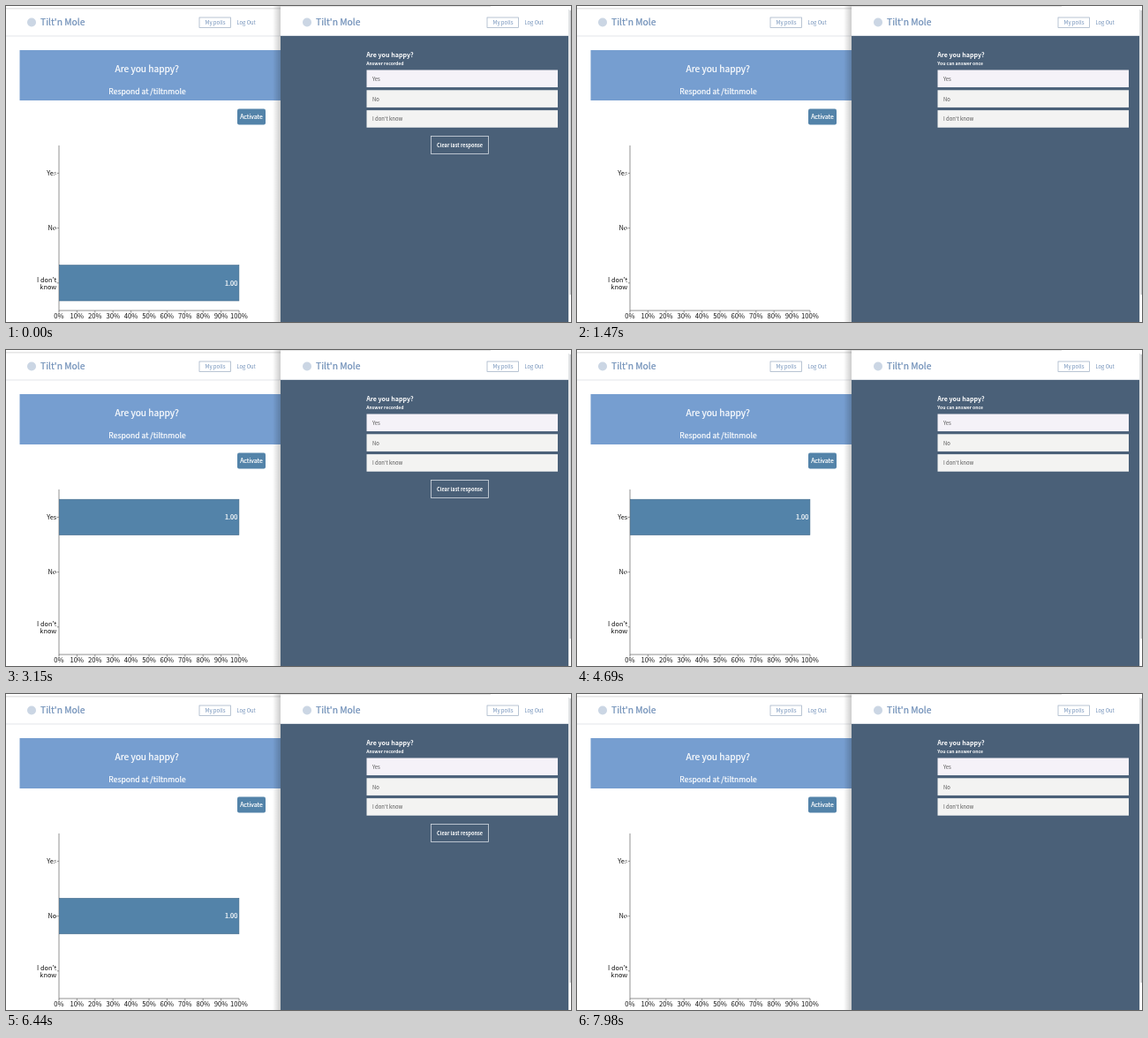
An HTML page for the animation above (8000 ms loop, 640x358 px).

```html
<!DOCTYPE html>
<html lang="en">
<head>
<meta charset="utf-8">
<title>Live poll</title>
<style>
  html, body { margin: 0; width: 100%; height: 100%; overflow: hidden; background: #fff; }
  svg { display: block; width: 100vw; height: 100vh; }
  text { font-family: "Noto Sans CJK SC", "Noto Sans CJK JP", "Noto Sans CJK", "Open Sans", sans-serif; }
  .bold { font-weight: 700; }
  .semi { stroke: currentColor; stroke-width: .22px; }
</style>
</head>
<body>
<svg id="stage" viewBox="0 0 640 358" preserveAspectRatio="none">
  <defs>
    <linearGradient id="shade">
      <stop offset="0" stop-color="#000" stop-opacity="0"/>
      <stop offset="1" stop-color="#000" stop-opacity=".2"/>
    </linearGradient>
  </defs>
</svg>
<script>
const NS = "http://www.w3.org/2000/svg";
const stage = document.getElementById("stage");
const LOOP = 8000;
const BLUE = "#5383a9", NAVY = "#4a6078", LINK = "#6f8fb8", WHITE = "#fff";
const OPTIONS = ["Yes", "No", "I don't know"];

function add(tag, attrs, parent = stage) {
  const el = document.createElementNS(NS, tag);
  for (const key in attrs) el.setAttribute(key, attrs[key]);
  parent.appendChild(el);
  return el;
}

function rect(x, y, width, height, fill, extra = {}, parent = stage) {
  return add("rect", { x, y, width, height, fill, ...extra }, parent);
}

function line(x1, y1, x2, y2, stroke, width = 0.8) {
  return add("line", { x1, y1, x2, y2, stroke, "stroke-width": width });
}

function text(content, x, y, size, fill, extra = {}, parent = stage) {
  const el = add("text", { x, y, "font-size": size, fill, color: fill, ...extra }, parent);
  el.textContent = content;
  return el;
}

const MIDDLE = { "text-anchor": "middle" }, END = { "text-anchor": "end" };
const BOLD = { class: "bold" }, SEMI = { class: "semi" };

function header(x, navX) {
  add("circle", { cx: x + 29, cy: 18.5, r: 5, fill: "#cbd6e4" });
  text("Tilt'n Mole", x + 39, 21.8, 10.3, LINK, SEMI);
  rect(navX, 13, 35.5, 11.5, "none", { stroke: "#9aabc0", "stroke-width": 0.7 });
  text("My polls", navX + 18, 21, 6, LINK, MIDDLE);
  text("Log Out", navX + 42.5, 21, 5.8, LINK);
}

// Results page
rect(0, 0, 640, 358, WHITE);
rect(0, 2.4, 311, 1, "#d8d8d8");
rect(0, 33.5, 311, 1, "#e4e6e9");
header(0, 219);
rect(15.5, 50, 295.5, 57, "#769ed0");
text("Are you happy?", 159.7, 75.2, 10.2, WHITE, { ...MIDDLE, ...SEMI });
text("Respond at /tiltnmole", 160, 100.2, 8.6, WHITE, { ...MIDDLE, ...SEMI });
rect(262, 116.5, 32, 18, BLUE, { rx: 2 });
text("Activate", 278, 128, 6.9, WHITE, { ...MIDDLE, ...SEMI });

// Chart
const rowY = i => 189.4 + i * 62.2;
line(60, 158, 60, 345.4, "#777");
line(60, 345, 264, 345, "#777");
for (let i = 0; i <= 10; i++) {
  const x = 60 + i * 20.4;
  line(x, 345, x, 347.6, "#777");
  text(i * 10 + "%", x, 354.2, 7.7, "#111", MIDDLE);
}
const rows = OPTIONS.map((name, i) => {
  const y = rowY(i);
  line(57.5, y, 60, y, "#777");
  const parts = i === 2 ? ["I don't", "know"] : [name];
  parts.forEach((part, k) =>
    text(part, 57.3, y + 2.7 + (parts.length > 1 ? k * 8 - 4 : 0), 7.4, "#111", END));
  const bar = add("g", {});
  rect(60.3, y - 20.2, 203.6, 40.4, BLUE, { stroke: "#41698a", "stroke-width": 0.6 }, bar);
  text("1.00", 262.2, y + 2.7, 7.3, WHITE, { ...END, ...SEMI }, bar);
  // A zero value is white and overlaps the label's end
  const zero = text("0", 58, y + 2.7, 7.3, WHITE, { ...END, ...SEMI });
  return { bar, zero };
});

// Voting page
rect(302, 0, 9, 358, "url(#shade)");
rect(311, 0, 329, 358, WHITE);
rect(311, 0, 238, 0.8, "#dedede");
rect(311, 33, 326, 1, "#dfe3e8");
header(312, 545);
rect(311, 34, 326, 324, NAVY);
rect(637, 4, 0.7, 354, "#d5d8dc");
rect(638.6, 5, 1.2, 322, "#b9bcc0");
text("Are you happy?", 408.3, 58, 7.1, WHITE, BOLD);
const note = text("", 408.3, 67.3, 5.1, WHITE, BOLD);
OPTIONS.forEach((name, i) => {
  const y = 72.5 + i * 22.8;
  rect(408.5, y, 216.5, 19.6, i ? "#f3f3f2" : "#f5f2f8");
  text(name, 415, y + 12.2, 5.9, "#555");
});
const clear = add("g", {});
rect(481.4, 147.4, 65.2, 20.2, "none", { stroke: "#d5dce4", "stroke-width": 0.8 }, clear);
text("Clear last response", 514, 159.9, 5.6, WHITE, { ...MIDDLE, ...BOLD }, clear);

// The chart follows each vote or clear after a short delay
const LAG = 140;
const VOTES = [
  { choice: 2, from: -1000, to: 1260 },
  { choice: 0, from: 2950, to: 4620 },
  { choice: 1, from: 6230, to: 7770 }
];
const voteAt = t => VOTES.find(v => t >= v.from && t < v.to);
const show = (el, on) => el.setAttribute("visibility", on ? "visible" : "hidden");

function draw(t) {
  const vote = voteAt(t), counted = voteAt(t - LAG);
  note.textContent = vote ? "Answer recorded" : "You can answer once";
  show(clear, vote);
  rows.forEach(({ bar, zero }, i) => {
    const on = counted && counted.choice === i;
    show(bar, on);
    show(zero, !on);
  });
}

const start = performance.now();
function tick() {
  draw((performance.now() - start) % LOOP);
  requestAnimationFrame(tick);
}
tick();
</script>
</body>
</html>
```
